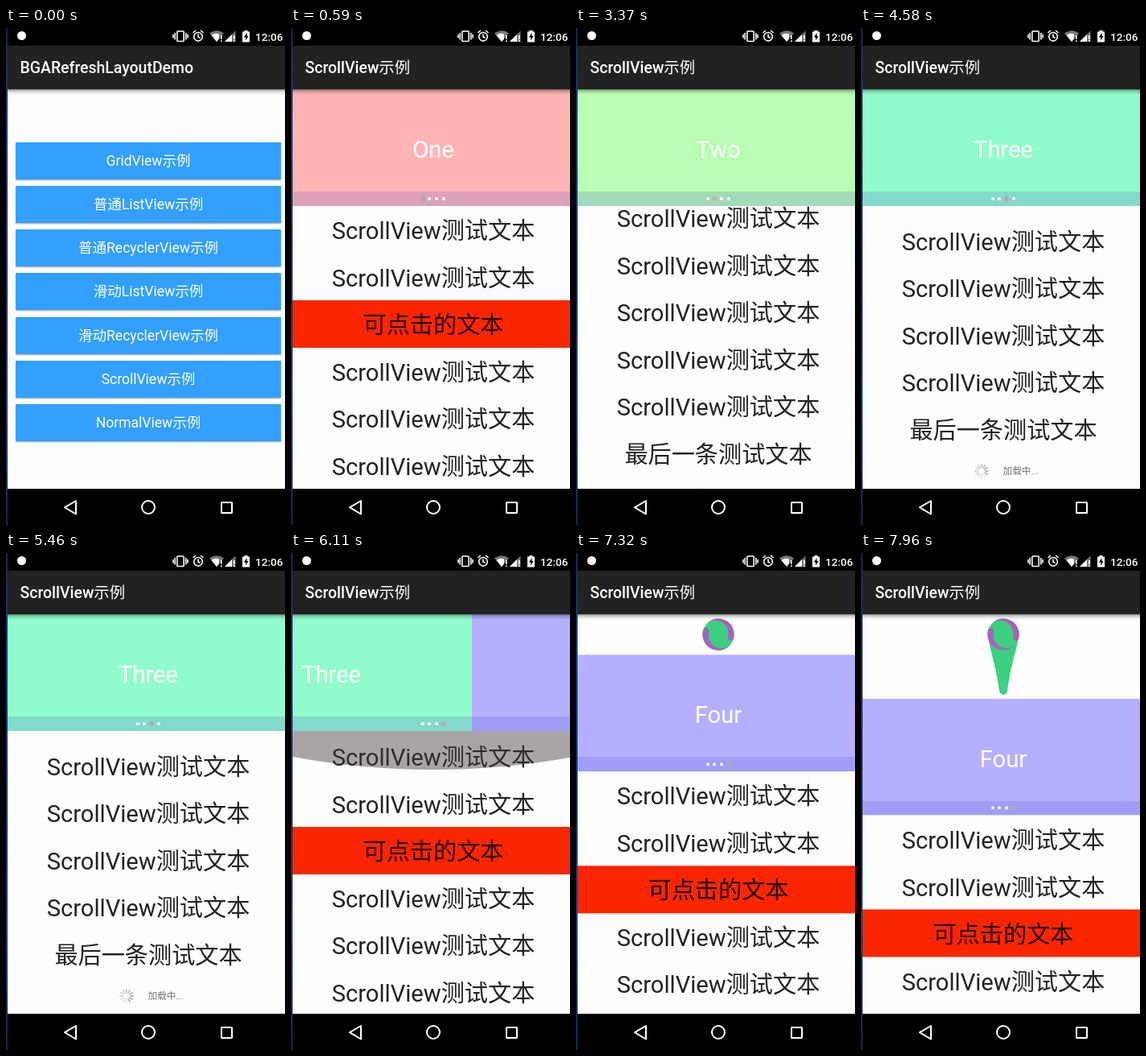
An HTML page for the animation above (8000 ms loop, 347x617 px).

```html
<!DOCTYPE html>
<html lang="zh-CN">
<head>
<meta charset="utf-8">
<title>ScrollView示例</title>
<style>
html, body { margin: 0; width: 100%; height: 100%; overflow: hidden; background: #000; }
body { font-family: Roboto, "Noto Sans CJK SC", "Noto Sans CJK", sans-serif; }
div, svg { position: absolute; }
svg { overflow: visible; }

#edge { left: 0; top: 0; width: 2px; height: 617px;
  background: linear-gradient(#16264f, #1f3d86 20%, #1a3068 50%, #203f88 75%, #14264f); }
/* The phone is 350px wide, its right rim lies outside the stage */
#stage { left: 0; top: 0; width: 347px; height: 617px; overflow: hidden; }
#phone { left: 2px; top: 0; width: 350px; height: 617px; overflow: hidden; background: #000; }
.screen { left: 0; top: 0; width: 350px; height: 617px; }
.bar { left: 0; top: 22px; width: 334.5px; height: 54px; padding-left: 15.5px; background: #222;
  color: #fff; font-weight: 500; font-size: 19.44px; line-height: 55px; white-space: nowrap; }
.body { left: 0; top: 76px; width: 350px; height: 496px; overflow: hidden; background: #fdfdfd; }
.shade { left: 0; top: 0; width: 350px; height: 7px;
  background: linear-gradient(rgba(0,0,0,.5), rgba(0,0,0,.28) 20%, rgba(0,0,0,.1) 55%, transparent); }

.btn { left: 10px; width: 330px; height: 46px; background: #339fff; color: #fff;
  font-size: 17.5px; line-height: 47px; text-align: center; box-shadow: 0 1.5px 1.5px rgba(0,0,0,.28); }

#win { animation: enter 8s linear infinite; }
#pull { left: 0; top: 0; width: 350px; height: 496px; animation: pull 8s linear infinite; }
#pager { left: 0; top: 0; width: 350px; height: 145px; overflow: hidden; }
#pages { left: 0; top: 0; width: 1400px; height: 145px; animation: slide 8s linear infinite; }
#pages div { top: 0; width: 350px; height: 145px; color: #fff; font-size: 29.17px; line-height: 150px; text-align: center; }
#marks { left: 0; top: 126.5px; width: 350px; height: 18.5px; background: rgba(70,75,200,.19); }
.dot, #mark { border-radius: 50%; }
.dot { width: 4px; height: 4px; top: 7.5px; background: #fff; }
#mark { width: 6px; height: 6px; top: 6.5px; left: 0; animation: mark 8s step-end infinite; }

#view { left: 0; top: 145px; width: 350px; height: 351px; overflow: hidden; background: #fdfdfd; }
#list { left: 0; top: 0; width: 350px; animation: scroll 8s linear infinite; }
.row { left: 0; width: 350px; height: 58.5px; line-height: 62px; font-size: 29.17px; color: #222; text-align: center; white-space: nowrap; }
.hot { background: #fb2600; color: #230800; }
#foot { left: 0; top: 702px; width: 350px; height: 45px; color: #757575; font-size: 11.67px; line-height: 46px; }
#foot span { position: absolute; left: 174.5px; white-space: nowrap; }
#spin { left: 148px; top: 22.5px; width: 1px; height: 1px; }
#spin g { animation: spin .84s steps(12) infinite; }
.glow { left: 0; width: 350px; height: 48px; fill: rgba(64,56,64,.45); }
#glowTop { top: 0; transform-origin: 0 0; animation: glowTop 8s linear infinite; }
#glowEnd { top: 303px; transform-origin: 0 48px; animation: glowEnd 8s linear infinite; }

#drop { left: 175px; top: 0; width: 1px; height: 1px; animation: drop 8s linear infinite; }
#tail { fill: #3cd080; animation: tail 8s linear infinite; }

#icons { left: 0; top: 0; width: 347px; height: 617px; }
#clock { left: 308px; top: 0; color: #fff; font-weight: 500; font-size: 13.6px; line-height: 22px; }
#status { left: 0; top: 0; width: 350px; height: 22px; background: #000; }

@keyframes enter {
  0%, 4.124% { opacity: 0; transform: translateY(38px); }
  4.125% { opacity: .4; transform: translateY(38px); animation-timing-function: cubic-bezier(.1,.6,.3,1); }
  7.375%, 100% { opacity: 1; transform: none; }
}
@keyframes slide {
  0%, 26.625% { transform: translateX(0); }
  27.375% { transform: translateX(-119.5px); animation-timing-function: cubic-bezier(.3,.6,.4,1); }
  31.125%, 51.25% { transform: translateX(-350px); }
  52% { transform: translateX(-470px); animation-timing-function: cubic-bezier(.3,.6,.4,1); }
  55.75%, 75.625% { transform: translateX(-700px); }
  76.375% { transform: translateX(-825.5px); animation-timing-function: cubic-bezier(.3,.6,.4,1); }
  80.125%, 100% { transform: translateX(-1050px); }
}
@keyframes mark {
  0% { transform: translateX(159.5px); background: #a3a9a8; }
  26.625% { transform: translateX(167.5px); background: #b9b2b4; }
  51.25% { transform: translateX(176px); background: #b9a8aa; }
  75.625%, 100% { transform: translateX(184.5px); background: #b0aab0; }
}
@keyframes scroll {
  0%, 21.625% { transform: translateY(0); animation-timing-function: cubic-bezier(.35,.1,.6,.9); }
  27.375% { transform: translateY(-336px); animation-timing-function: ease-out; }
  28.875%, 41.5% { transform: translateY(-351px); animation-timing-function: ease-out; }
  44.5%, 68.874% { transform: translateY(-396px); }
  68.875%, 73.375% { transform: translateY(-351px); animation-timing-function: ease-in; }
  75.875% { transform: translateY(0); }
  76.375% { transform: translateY(2px); }
  81%, 100% { transform: translateY(0); }
}
@keyframes glowTop {
  0%, 75.625% { opacity: 0; transform: scaleY(0); }
  76.375%, 77.125% { opacity: 1; transform: none; }
  82.125%, 100% { opacity: 0; transform: scaleY(0); }
}
@keyframes glowEnd {
  0%, 28.125% { opacity: 0; transform: scaleY(0); }
  28.875% { opacity: .8; transform: scaleY(.8); }
  32.625%, 100% { opacity: 0; transform: scaleY(.2); }
}
@keyframes pull {
  0%, 85.749% { transform: translateY(0); }
  85.75% { transform: translateY(10px); }
  95.75% { transform: translateY(80px); }
  99.5%, 100% { transform: translateY(104.5px); }
}
/* The blob rides down with the header, then stays while its tail stretches */
@keyframes drop {
  0%, 85.749% { transform: translateY(-24.5px); }
  85.75% { transform: translateY(-14.5px); }
  91.4%, 100% { transform: translateY(25px); }
}
@keyframes tail {
  0%, 91.4% { d: path("M-19.5 0C-19.5 5.2 -17.4 10.2 -13.8 13.8C-6.2 21.4 6.2 21.4 13.8 13.8C17.4 10.2 19.5 5.2 19.5 0Z"); }
  99.5%, 100% { d: path("M-19.5 0C-18 14 -9 40 -5 70C-4.5 76.5 4.5 76.5 5 70C9 40 18 14 19.5 0Z"); }
}
@keyframes spin { to { transform: rotate(360deg); } }
</style>
</head>
<body>
<div id="edge"></div>
<div id="stage">
  <div id="phone">
    <div class="screen">
      <div class="body" id="home"><div class="shade"></div></div>
      <div class="bar">BGARefreshLayoutDemo</div>
    </div>
    <div class="screen" id="win">
      <div class="screen" style="top:76px;height:541px;background:#000"></div>
      <div class="body">
        <div id="pull">
          <div id="pager">
            <div id="pages"></div>
            <div id="marks"></div>
          </div>
          <div id="view">
            <div id="list">
              <div id="foot"><svg id="spin"><g></g></svg><span>加载中...</span></div>
            </div>
            <svg class="glow" id="glowTop"><path d="M0 0H350V32Q175 64 0 32Z"/></svg>
            <svg class="glow" id="glowEnd"><path d="M0 48H350V16Q175 -16 0 16Z"/></svg>
          </div>
        </div>
        <svg id="drop">
          <path id="tail" d="M-19.5 0C-19.5 5.2 -17.4 10.2 -13.8 13.8C-6.2 21.4 6.2 21.4 13.8 13.8C17.4 10.2 19.5 5.2 19.5 0Z"/>
          <circle r="19.5" fill="#3cd080"/>
          <g fill="#a862bd">
            <path id="swirl" d="M-19.2 -4A19.5 19.5 0 0 0 13 14.5A16.5 16.5 0 0 1 -11.8 -4A3.7 3.7 0 0 0 -19.2 -4Z"/>
            <use href="#swirl" transform="rotate(180)"/>
          </g>
        </svg>
        <div class="shade"></div>
      </div>
      <div class="bar">ScrollView示例</div>
    </div>
    <div id="status"></div>
    <div id="clock">12:06</div>
  </div>
</div>
<svg id="icons" fill="#fff">
  <circle cx="19.5" cy="9.5" r="5.5"/>
  <g fill="none" stroke="#fff" stroke-width="1.6">
    <rect x="212.8" y="4" width="8.4" height="12.5" rx="1"/>
    <path d="M210.2 6V14.5M223.8 6V14.5M208 8V12.5M226 8V12.5"/>
    <circle cx="239" cy="10.8" r="5.3"/>
    <path d="M239 7.5V11L241.5 12.5M232.5 6L236 3M245.5 6L242 3"/>
  </g>
  <path d="M253 6.5Q262 0 271 6.5L262 17Z" fill="#777"/>
  <path d="M255.5 9Q260 5.5 265 7.5V13.5L262 17Z"/>
  <path d="M267 9h1.6v5h-1.6zM267 15.3h1.6v1.7h-1.6z"/>
  <path d="M285.5 3.5V17H272Z" fill="#777"/>
  <path d="M281 8V17H272Z"/>
  <path d="M283 9h1.7v5h-1.7zM283 15.3h1.7v1.7h-1.7z"/>
  <path d="M296.5 3V4.5H294V17.5H303V4.5H300.5V3Z"/>
  <path d="M299.5 6L296 11.5H298.2V15.5L301.5 10H299.5Z" fill="#000"/>
  <g fill="none" stroke="#fff" stroke-width="2">
    <path d="M87 587V603.5L73 595.2Z" stroke-linejoin="round"/>
    <circle cx="177" cy="595" r="8"/>
    <rect x="268" y="589" width="13" height="13" rx=".5"/>
  </g>
</svg>
<script>
const $ = id => document.getElementById(id);

function add(parent, cls, text, style) {
  const el = document.createElement('div');
  el.className = cls;
  el.textContent = text;
  Object.assign(el.style, style);
  parent.append(el);
  return el;
}

['GridView', '普通ListView', '普通RecyclerView', '滑动ListView', '滑动RecyclerView', 'ScrollView', 'NormalView']
  .forEach((name, i) => add($('home'), 'btn', name + '示例', { top: 65.7 + i * 54.25 + 'px' }));

const colors = ['#ffb4b4', '#b9fdb4', '#91fccb', '#b4b0ff'];
['One', 'Two', 'Three', 'Four'].forEach((name, i) => {
  add($('pages'), '', name, { left: i * 350 + 'px', background: colors[i] });
  add($('marks'), 'dot', '', { left: 159.5 + i * 8.9 + 'px' });
});
add($('marks'), '', '', {}).id = 'mark';

const rows = 12;
for (let i = 0; i < rows; i++) {
  const text = i === 2 ? '可点击的文本' : i === rows - 1 ? '最后一条测试文本' : 'ScrollView测试文本';
  add($('list'), i === 2 ? 'row hot' : 'row', text, { top: i * 58.5 + 'px' });
}

const spokes = document.querySelector('#spin g');
for (let i = 0; i < 12; i++) {
  const line = document.createElementNS('http://www.w3.org/2000/svg', 'path');
  line.setAttribute('d', 'M0 -4.5V-8.3');
  line.setAttribute('stroke', `rgba(90,90,90,${0.14 + i * 0.03})`);
  line.setAttribute('stroke-width', 1.8);
  line.setAttribute('stroke-linecap', 'round');
  line.setAttribute('transform', `rotate(${i * 30})`);
  spokes.append(line);
}
</script>
</body>
</html>
```
